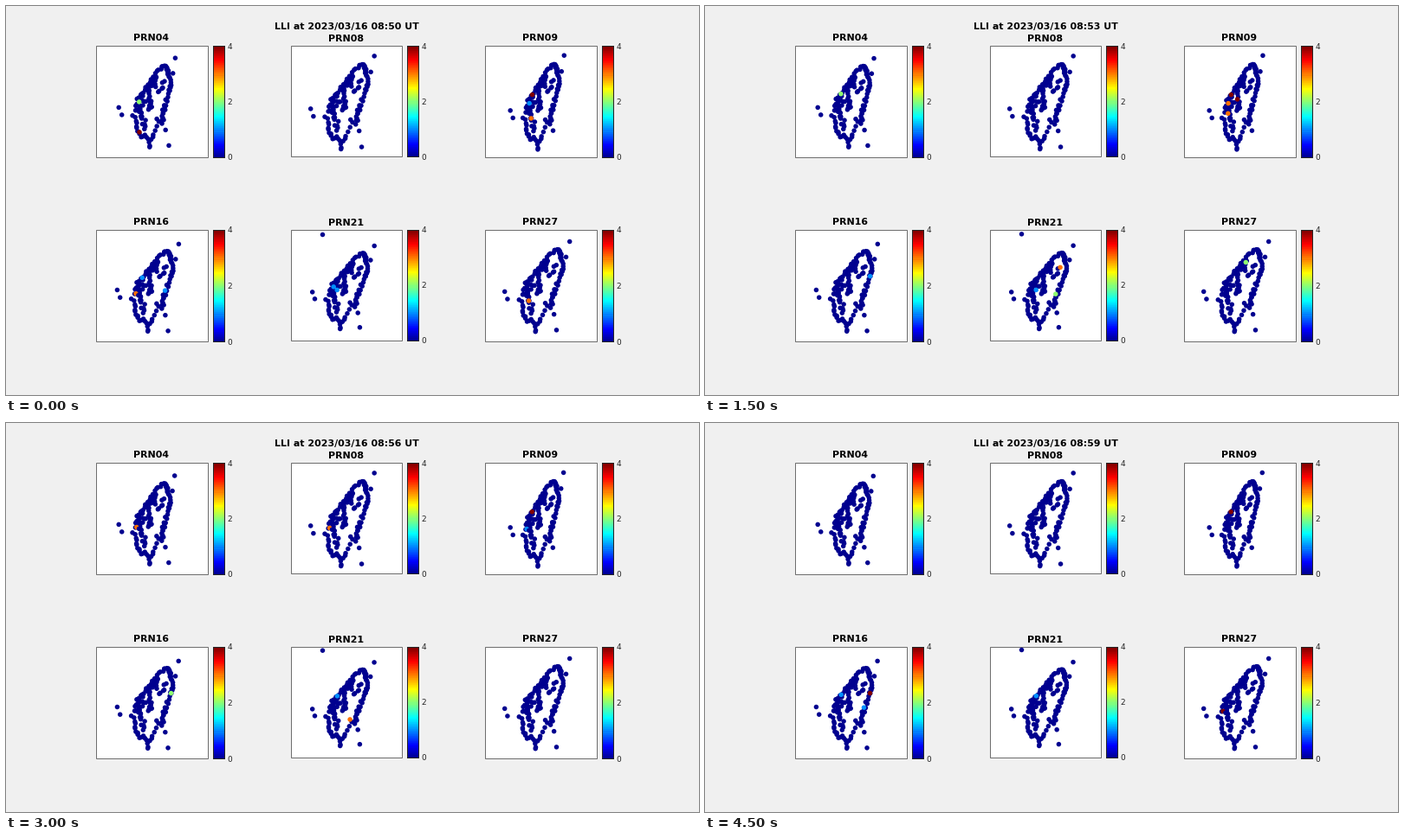
Recreate the animation shown at these times as a matplotlib script. Size 800 by 450 pixels, loop 5000 ms.

```python
import numpy as np
import matplotlib.pyplot as plt
from matplotlib.animation import FuncAnimation
from matplotlib.patches import Rectangle

FRAMES, STEP = 10, 500
PT = 0.72  # points per pixel at 100 dpi
INK = "#262626"

# west, north and south anchor stations of each panel, and how far north drifts
PANELS = {
    "PRN04": ([(130.5, 117.5), (195.7, 60.3), (166.1, 163.3)], (-1.1, 1.2)),
    "PRN08": ([(352, 119), (425.5, 58), (387, 165.6)], (0, 0)),
    "PRN09": ([(582.5, 121), (644.6, 57.3), (614.2, 166)], (-1, 0.3)),
    "PRN16": ([(128.7, 328.6), (199.7, 275.5), (164, 376.4)], (-0.3, 0)),
    "PRN21": ([(354, 331), (425.5, 277.6), (386, 373.6)], (-0.2, -0.9)),
    "PRN27": ([(576, 330.5), (651, 272.6), (611.5, 376.8)], (0, 0)),
}
HOME = np.array(PANELS["PRN04"][0])

# lone stations, in the first panel's pixels
LONE = [*HOME, (134, 126), (184.5, 143.5), (166.3, 161.8), (193, 78)]
ISLET = (188.3, 161.5)

# strings of stations along coasts and valleys: count, scatter, corner points
CHAINS = [
    (20, 1.2, [(183, 69.5), (176, 74), (167, 87), (158, 101), (152, 108)]),
    (12, 1.7, [(152, 109), (147.5, 124), (151, 137), (154, 148)]),
    (5, 0.8, [(156, 151), (162, 152), (166, 157)]),
    (6, 0.7, [(168, 155), (171.5, 147.5), (176, 134)]),
    (32, 1.4, [(184, 70), (187, 75), (191, 89), (187, 103), (182, 123), (181, 135)]),
    (18, 2.2, [(173, 84), (166, 95), (167, 121)]),
    (18, 2.8, [(156, 113), (158, 126), (162, 147)]),
    (8, 2.0, [(170, 88), (177, 100), (181, 90)]),
    (7, 2.0, [(158, 106), (167, 118)]),
]

# stations that raise flags
SITES = {
    "A": (157.3, 101.6), "B": (154, 111), "C": (151.2, 120.5), "D": (154.3, 146),
    "E": (189, 98), "F": (165.2, 107.2), "G": (183, 115), "H": (181, 120.2),
    "I": (173, 84), "K": (183.3, 87.2), "M": (187, 79), "N": (174.4, 130.7),
    "P": (156.7, 128), "Q": (154, 122.3), "R": (158.3, 115),
}

# spells of flagging: sites, first and last minute, level at each end
SPELLS = {
    "PRN04": [("B", 0, 2, 2, 4), ("D", 0, 2, 4, 4), ("A", 2, 4, 1, 3), ("B", 4, 5, 1, 2),
              ("C", 5, 7, 1, 4)],
    "PRN08": [("B", 4, 4, 1, 1), ("C", 5, 7, 1, 4)],
    "PRN09": [("A", 0, 9, 4, 4), ("B", 0, 4, 1, 3), ("P", 0, 0, 3, 3), ("F", 2, 4, 4, 4),
              ("Q", 2, 3, 4, 3), ("C", 4, 7, 1, 1)],
    "PRN16": [("AG", 0, 0, 1, 1), ("C", 0, 0, 3, 3), ("E", 2, 3, 1, 1), ("E", 5, 9, 1, 4),
              ("AG", 9, 9, 1, 1)],
    "PRN21": [("BR", 0, 0, 1, 1), ("H", 2, 3, 2, 2), ("K", 3, 5, 3, 2), ("R", 3, 4, 1, 1),
              ("A", 5, 9, 1, 1), ("N", 5, 7, 4, 2)],
    "PRN27": [("P", 0, 0, 3, 3), ("I", 2, 3, 3, 2), ("G", 5, 5, 4, 4), ("C", 9, 9, 4, 4)],
}


def jet(level):
    """64-step jet colour for levels 0..63."""
    t = 4 * (np.asarray(level) + 1) / 64
    return np.clip(np.stack([1.5 - abs(t - c) for c in (3, 2, 1)], -1), 0, 1)


def chain(rng, count, spread, corners):
    pts = np.array(corners, float)
    along = np.linspace(0, len(pts) - 1, count)
    line = [np.interp(along, range(len(pts)), pts[:, k]) for k in (0, 1)]
    return np.stack(line, 1) + rng.uniform(-spread, spread, (count, 2))


rng = np.random.default_rng(16)
FIELD = np.vstack([LONE] + [chain(rng, *c) for c in CHAINS] + [list(SITES.values())])


def place(points, anchors):
    """Affine move that carries the home anchors onto the given ones."""
    basis = np.column_stack([HOME, np.ones(3)])
    return np.column_stack([points, np.ones(len(points))]) @ np.linalg.solve(basis, anchors)


def panel_dots(name, t):
    anchors, drift = PANELS[name]
    now = np.array(anchors, float)
    now[1] += t * np.array(drift)
    field = FIELD if name == "PRN09" else np.vstack([[ISLET], FIELD])
    dots = place(field, now)
    if name == "PRN21":
        dots = np.vstack([[(365.8, 264.6 - 2 * t)], dots])
    return dots


def panel_levels(name, step):
    levels = dict.fromkeys(SITES, 0)
    for sites, first, last, start, end in SPELLS[name]:
        if first <= step <= last:
            for s in sites:
                levels[s] = int(np.interp(step, [first, last], [start, end]) + 0.5)
    return list(levels.values())


fig = plt.figure(figsize=(8, 4.5), dpi=100, facecolor="#f0f0f0")
ax = fig.add_axes([0, 0, 1, 1])
ax.axis("off")


def label(x, y, s, size, **kw):
    return ax.text(x, y, s, fontsize=size * PT, family="DejaVu Sans", **kw)


def bold(x, y, s):
    return label(x, y, s, 11, weight="bold", ha="center", va="baseline", color="black")


def box(x0, y0, x1, y1, edge, fill, z):
    ax.add_patch(Rectangle((x0 + 0.5, y0 + 0.5), x1 - x0, y1 - y0, fc=fill, ec=edge,
                           lw=PT, zorder=z, snap=False))


def draw_panel(i, name):
    row, col = divmod(i, 3)
    x0, y0 = (104, 329, 553)[col], (46, 259)[row]
    side = 128 if col == 1 else 129
    x1, y1 = x0 + side, y0 + side
    box(x0, y0, x1, y1, "#6e6e6e", "white", 1)
    bold(x0 + side / 2 - 0.5, y0 - 5 if col == 1 else y0 - 6, name)
    left, right = x1 + 6, x1 + 19
    ax.imshow(jet(np.arange(63, -1, -1))[:, None, :], extent=(left, right + 1, y1 + 1, y0),
              aspect="auto", interpolation="nearest", zorder=2)
    box(left, y0, right, y1, INK, "none", 3)
    for v in (0, 2, 4):
        label(x1 + 22.5, y1 - side * v / 4, str(v), 9, va="center_baseline", color=INK)


for i, name in enumerate(PANELS):
    draw_panel(i, name)

ax.set_xlim(0, 800)
ax.set_ylim(450, 0)

title = bold(393.3, 27, "")
scatter = ax.scatter([], [], s=(5.5 * PT) ** 2, lw=0, zorder=4, snap=False)


def draw(step):
    title.set_text(f"LLI at 2023/03/16 08:{50 + step} UT")
    spots, levels = [], []
    for name in PANELS:
        dots = panel_dots(name, step / (FRAMES - 1))
        flags = panel_levels(name, step)
        spots.append(dots)
        levels += [0] * (len(dots) - len(flags)) + flags
    scatter.set_offsets(np.vstack(spots) - (0.3, 0.1))
    scatter.set_facecolor(jet(np.minimum(np.array(levels) * 16, 63)))
    return title, scatter


anim = FuncAnimation(fig, draw, frames=FRAMES, interval=STEP, repeat=True, repeat_delay=0)
plt.show()
```
